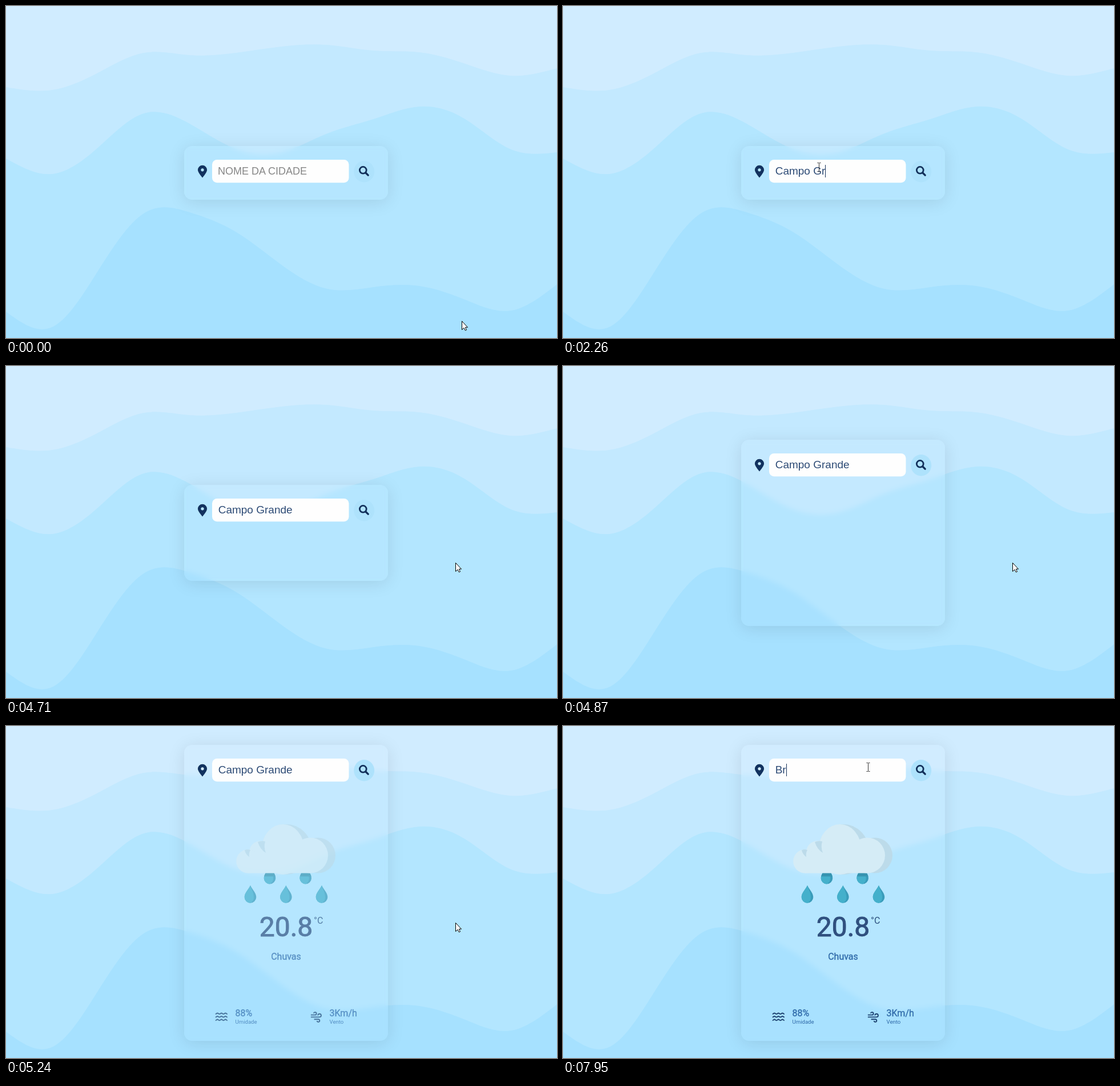
An HTML page for the animation above (8 s loop, 965 by 581 pixels).

```html
<!DOCTYPE html>
<html lang="pt">
<head>
<meta charset="utf-8">
<title>Clima</title>
<style>
html, body { margin: 0; width: 100%; height: 100%; overflow: hidden; background: #d0ecff; }
svg { position: absolute; left: 0; top: 0; display: block; }
#panel {
  position: absolute; left: 312px; width: 357px; border-radius: 14px;
  background: rgba(255, 255, 255, .03);
  box-shadow: 0 4px 30px rgba(0, 0, 0, .1);
  backdrop-filter: blur(5px);
}
text { white-space: pre; }
.field { font: 19px "Liberation Sans", Arial, sans-serif; fill: #2c4a75; }
.hint { font: 18px "Liberation Sans", Arial, sans-serif; fill: #868686; }
.info { font: 16px Roboto, sans-serif; color: #2e69a8; fill: currentColor; }
.info .strong { stroke: currentColor; stroke-width: .02em; }
.info .temp { font-size: 48px; color: #30507f; }
.info .label { font-size: 9.6px; }
</style>
</head>
<body>
<svg id="waves" width="965" height="581"></svg>
<div id="panel"></div>
<svg width="965" height="581">
  <defs>
    <g id="drop">
      <path fill="#3a9cba" d="M0 0C3 7 10.3 13 10.3 20.5A10.3 10.3 0 0 1-10.3 20.5C-10.3 13-3 7 0 0Z"/>
      <path fill="#44b0cb" d="M0 0C2 7 6 13 6 20.5C6 25.5 4 28.5 0 30.8A10.3 10.3 0 0 1-10.3 20.5C-10.3 13-3 7 0 0Z"/>
    </g>
    <g id="highDrop">
      <use href="#drop"/>
      <path fill="#3694b0" d="M-7.4 11H7.4L10 17.6H-10Z"/>
    </g>
  </defs>

  <g id="card">
    <path fill="#12325f" fill-rule="evenodd" transform="translate(335.9 66.8)" d="M8.1 21.6Q0 12 0 8.1A8.1 8.1 0 0 1 16.2 8.1Q16.2 12 8.1 21.6ZM8.1 5.4a2.7 2.7 0 1 0 .01 0Z"/>
    <rect x="361" y="57" width="239.5" height="40.3" rx="8.5" fill="#fefefe"/>
    <ellipse id="button" cx="627.2" cy="77.8" rx="18" ry="18.7"/>
    <g fill="none" stroke="#12305a" stroke-width="2.8">
      <circle cx="625.3" cy="75.3" r="5.9"/>
      <path stroke-width="3.3" stroke-linecap="round" d="M630 80L634.2 84.2"/>
    </g>
    <text id="hint" class="hint" x="371" y="83">NOME DA CIDADE</text>
    <text id="typed" class="field" x="371.7" y="83"></text>
    <rect id="mark" y="66" height="22.5" fill="#0078d7"/>
    <text id="marked" class="field" y="83" style="fill:#fff"></text>
    <rect id="caret" y="66" width="1" height="22" fill="#17335c"/>

    <g id="result">
      <use href="#highDrop" x="462" y="245.7"/>
      <use href="#highDrop" x="524.7" y="245.7"/>
      <use href="#drop" x="428" y="279"/>
      <use href="#drop" x="490.4" y="279"/>
      <use href="#drop" x="553" y="279"/>
      <g fill="#bcdbea">
        <circle cx="491" cy="216" r="44"/>
        <circle cx="546" cy="226.5" r="31"/>
      </g>
      <g fill="#d5ecf6">
        <circle cx="533" cy="226.5" r="31"/>
        <ellipse cx="485" cy="216" rx="37.5" ry="44"/>
        <circle cx="446" cy="221" r="20"/>
        <circle cx="424" cy="236.7" r="20.8"/>
        <path d="M424 222H533V257.5H424Z"/>
      </g>
      <path fill="#bcdbea" d="M441 203Q447 200 454 202Q451 212 455 222Q445 216 441 203ZM418 217.5Q422 215 428 217Q425 222 426 229Q420 225 418 217.5Z"/>
      <g class="info">
        <text class="strong temp" x="490.5" y="368" text-anchor="middle">20.8</text>
        <text x="539" y="346" fill="#2b507f">°C</text>
        <text class="strong" x="490.5" y="409" text-anchor="middle">Chuvas</text>
        <text class="strong" x="401.5" y="508">88%</text>
        <text class="label" x="401.5" y="521">Umidade</text>
        <text class="strong" x="566.5" y="508">3Km/h</text>
        <text class="label" x="566.5" y="521">Vento</text>
      </g>
      <g fill="none" stroke="#1f4472" stroke-width="2">
        <path id="water"/>
        <path transform="translate(532 498) scale(.95)" d="M2 8H9.5a2.5 2.5 0 1 0-2.25-3M2 12H18a3 3 0 1 0-3-3M8 16H15.5a2.5 2.5 0 1 1-2.25 3"/>
      </g>
    </g>
  </g>

  <g id="pointer" stroke="#000" fill="#fff" stroke-linejoin="round">
    <path id="arrow" d="M.5.5V15.5L4 12.3 6.3 16.8 8.5 15.9 6.4 11.3H10.5Z"/>
    <path id="hand" transform="translate(-6.5 -1)" d="M5.5 2.4c0-2 3-2 3 0v6c1-.8 2.6-.4 2.8.7 1-.6 2.4-.2 2.6.9 1-.4 2.3.2 2.3 1.6v3.9c0 2-1 3-1.5 4.5v1.6H6.8v-1.5L1.5 13.5c-1.2-1.6.8-3 2-1.8l2 2.3zM8.5 8.4v4M11.3 9.2v3.3M13.9 10.1v2.6"/>
    <path id="beam" fill="none" stroke="#333" d="M-3-7.5H-1Q0-7.5 0-6.5V6.5Q0 7.5-1 7.5H-3M3-7.5H1Q0-7.5 0-6.5M3 7.5H1Q0 7.5 0 6.5"/>
  </g>
</svg>
<script>
const LOOP = 8000, TEXT_X = 371.7, MID = 291.9, CITY = 'Campo Grande';
const $ = id => document.getElementById(id);
const show = (id, on) => { $(id).style.display = on ? '' : 'none'; };
const mix = (a, b, k) => a + (b - a) * k;
const smooth = k => k * k * (3 - 2 * k);
const span = (t, from, to) => Math.max(0, Math.min(1, (t - from) / (to - from)));

// Each wave is a cubic spline through evenly spaced heights.
const waves = {
  '#c3e9ff': [142, 147, 117, 82, 86, 82, 71, 68, 78, 81, 101, 122, 109],
  '#b3e6ff': [267, 294, 248, 188, 206, 250, 256, 223, 198, 176, 198, 251, 256],
  '#a6e1ff': [535, 562, 464, 363, 361, 395, 453, 495, 492, 490, 514, 533, 487]
};
function curve(y) {
  const n = y.length - 1, step = 965 / n;
  const at = i => y[Math.max(0, Math.min(n, i))];
  const m = y.map(() => 0);
  for (let pass = 0; pass < 20; pass++)
    y.forEach((_, i) => {
      const edge = i === 0 || i === n;
      m[i] = (3 * (at(i + 1) - at(i - 1)) - (m[i - 1] || 0) - (m[i + 1] || 0)) / (edge ? 2 : 4);
    });
  let d = `M0 ${y[0]}`;
  for (let i = 1; i <= n; i++) {
    const x = i * step;
    d += `C${x - step * 2 / 3} ${y[i - 1] + m[i - 1] / 3} ${x - step / 3} ${y[i] - m[i] / 3} ${x} ${y[i]}`;
  }
  return d + 'V581H0Z';
}
$('waves').innerHTML = Object.entries(waves)
  .map(([fill, y]) => `<path fill="${fill}" d="${curve(y)}"/>`).join('');
$('water').setAttribute('d', [0, 1, 2].map(i =>
  `M366.8 ${504 + 5.6 * i}` + 'c1.8 0 1.8-1.6 3.5-1.6s1.7 1.6 3.5 1.6'.repeat(3)).join(''));

const pen = document.createElement('canvas').getContext('2d');
pen.font = '19px "Liberation Sans", Arial, sans-serif';
const textEnd = s => TEXT_X + pen.measureText(s).width;

// One letter, a slow burst, then a fast one.
function textAt(t) {
  if (t >= 7950) return 'Br';
  if (t < 1070) return '';
  if (t < 1460) return CITY[0];
  const count = t < 2100 ? 2 + Math.floor((t - 1460) / 165) : 6 + Math.floor((t - 2100) / 79);
  return CITY.slice(0, count);
}

// Three clicks: caret, then the last word, then everything.
const CLICKS = { caret: 6720, word: 6870, all: 7020, end: 7950 };
function selectionAt(t) {
  if (t < CLICKS.word || t >= CLICKS.end) return null;
  return t < CLICKS.all ? CITY.indexOf(' ') + 1 : 0;
}
function caretAt(t) {
  if (t < 2580) return t >= 760;
  if (t < 4000) return Math.floor((t - 2580) / 530) % 2 === 0;
  return t >= CLICKS.caret && selectionAt(t) === null;
}

// Pointer moves: from time, to time, x, y.
const moves = [
  [70, 800, 448, 282], [3030, 3150, 799, 297], [3280, 3640, 625, 296],
  [4080, 4410, 787, 344], [6100, 6520, 534, 72]
];
const pointerAt = t => moves.reduce(([x, y], [from, to, nx, ny]) => {
  const k = smooth(span(t, from, to));
  return [mix(x, nx, k), mix(y, ny, k)];
}, [798, 551]);

// Same curve as the CSS ease-out keyword.
function easeOut(k) {
  let lo = 0, hi = 1;
  for (let i = 0; i < 24; i++) {
    const u = (lo + hi) / 2;
    if (1.74 * u * u * (1 - u) + u ** 3 < k) lo = u; else hi = u;
  }
  return smooth(lo);
}

function render(t) {
  const height = mix(93.5, 518.5, easeOut(span(t, 4646, 5236)));
  const top = MID - height / 2;
  $('panel').style.top = top + 'px';
  $('panel').style.height = height + 'px';
  $('card').setAttribute('transform', `translate(0 ${Math.round(top - 33)})`);
  $('result').style.opacity = smooth(span(t, 5090, 5330));

  const text = textAt(t);
  $('typed').textContent = text;
  show('hint', !text);

  const from = selectionAt(t), marking = from !== null;
  show('mark', marking);
  show('marked', marking);
  if (marking) {
    const x = textEnd(text.slice(0, from));
    $('mark').setAttribute('x', x);
    $('mark').setAttribute('width', textEnd(text) - x);
    $('marked').setAttribute('x', x);
    $('marked').textContent = text.slice(from);
  }
  show('caret', caretAt(t));
  $('caret').setAttribute('x', Math.floor(textEnd(text) + .3));

  const [x, y] = pointerAt(t);
  const inField = x > 361 && x < 600 && y > top + 24 && y < top + 64;
  const onButton = Math.hypot(x - 627, y - top - 44.8) < 18.5;
  show('beam', inField);
  show('hand', onButton);
  show('arrow', !inField && !onButton);
  $('pointer').setAttribute('transform', `translate(${Math.round(x) + (inField ? .5 : 0)} ${Math.round(y)})`);
  $('button').setAttribute('fill', onButton ? '#90d6fc' : '#aee2fc');
}

const start = performance.now();
function tick() {
  render((performance.now() - start) % LOOP);
  requestAnimationFrame(tick);
}
tick();
</script>
</body>
</html>
```
